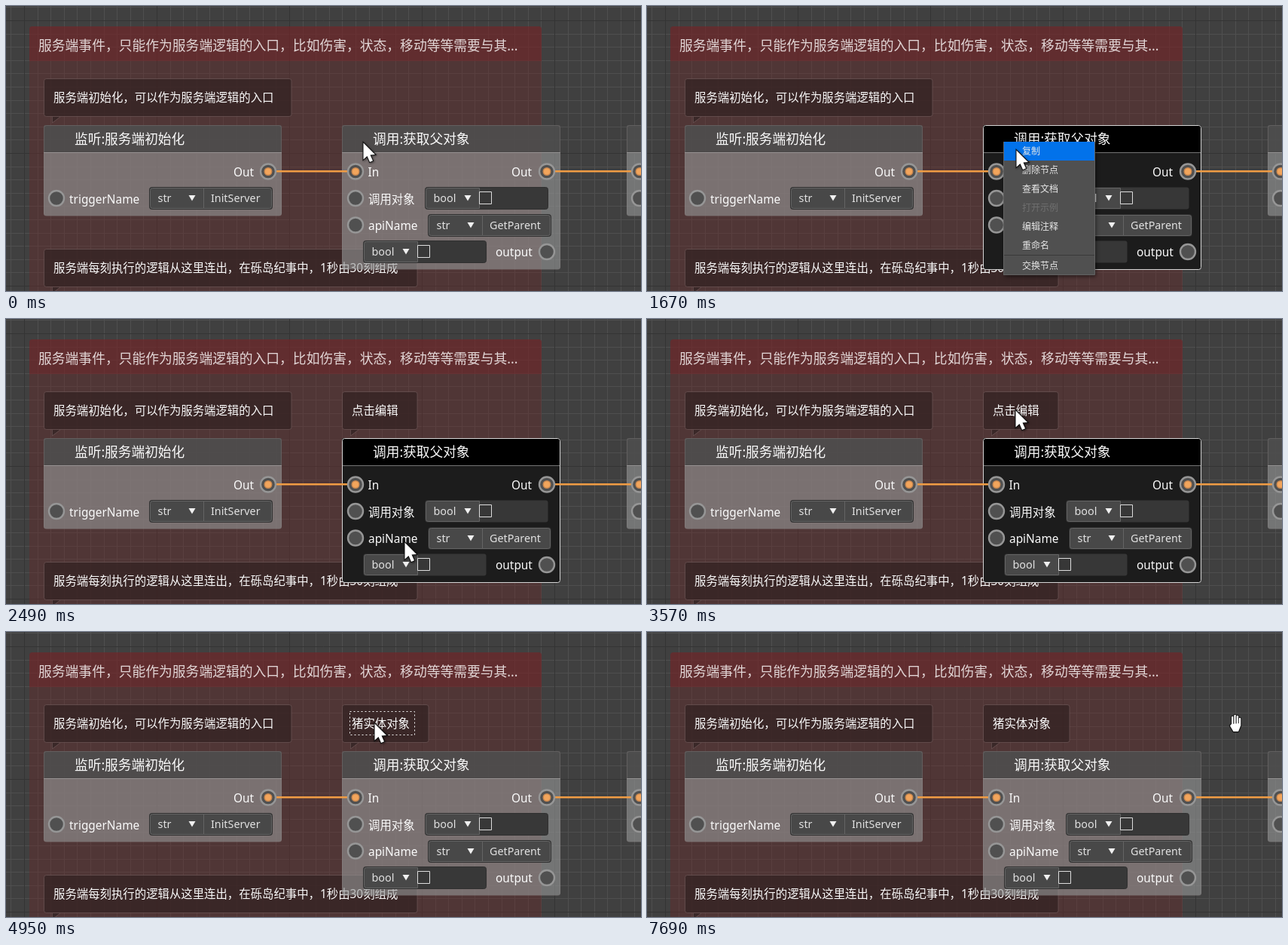
Recreate the animation shown at these times as an HTML page with a canvas. Size 843 px wide and 378 px high, loop 8.48 s.

```html
<!DOCTYPE html>
<html lang="zh-CN">
<head>
<meta charset="utf-8">
<style>
html, body { margin: 0; width: 100%; height: 100%; overflow: hidden; background: #404040; }
canvas { display: block; }
</style>
</head>
<body>
<canvas id="stage" width="843" height="378"></canvas>
<script>
const c = document.getElementById('stage').getContext('2d');
const LOOP = 8480, ORANGE = '#f09c44';
const MENU = ['复制', '删除节点', '查看文档', '打开示例', '编辑注释', '重命名', '交换节点'];
// Cursor moves: first change, last change, steps, target x, target y
const MOVES = [
  [1670, 1670, 1, 490, 191],
  [1740, 2090, 6, 529, 296],
  [3020, 3570, 8, 489, 121],
  [5480, 5760, 5, 574, 124],
  [6350, 6490, 3, 572, 122],
  [7410, 7690, 5, 781, 121]
];

function box(x, y, w, h, fill, stroke, r = 3) {
  c.beginPath();
  c.roundRect(x, y, w, h, r);
  if (fill) { c.fillStyle = fill; c.fill(); }
  if (stroke) { c.strokeStyle = stroke; c.lineWidth = 1; c.stroke(); }
}

function text(s, x, y, size = 15.4, color = '#fafafa', weight = 400) {
  c.font = `${weight} ${size}px "Noto Sans", "Noto Sans CJK SC", sans-serif`;
  c.fillStyle = color;
  c.fillText(s, x, y);
}

function poly(points, fill, stroke, width = 1) {
  c.beginPath();
  points.forEach(([x, y]) => c.lineTo(x, y));
  c.closePath();
  if (stroke) { c.strokeStyle = stroke; c.lineWidth = width; c.stroke(); }
  if (fill) { c.fillStyle = fill; c.fill(); }
}

function line(x1, y1, x2, y2, color, width = 1) {
  c.beginPath();
  c.moveTo(x1, y1);
  c.lineTo(x2, y2);
  c.strokeStyle = color;
  c.lineWidth = width;
  c.stroke();
}

function disc(x, y, r, fill, stroke, width) {
  c.beginPath();
  c.arc(x, y, r, 0, 7);
  if (fill) { c.fillStyle = fill; c.fill(); }
  if (stroke) { c.strokeStyle = stroke; c.lineWidth = width; c.stroke(); }
}

function grid(offset, step, color) {
  for (let x = 24 + offset; x < 843; x += step) line(Math.round(x) + .5, 0, Math.round(x) + .5, 378, color);
  for (let y = 19 + offset; y < 378; y += step) line(0, Math.round(y) + .5, 843, Math.round(y) + .5, color);
}

function group() {
  box(31, 27, 680, 400, 'rgba(100,42,42,.45)', null, 4);
  box(31, 27, 680, 46, 'rgba(118,34,38,.45)', null, [4, 4, 0, 0]);
  text('服务端事件，只能作为服务端逻辑的入口，比如伤害，状态，移动等等需要与其...', 43, 58.6, 17.8, '#e2d6d6', 300);
}

function bubble(x, y, w, label) {
  const fill = 'rgba(50,34,34,.72)', edge = 'rgba(118,94,94,.6)';
  box(x + .5, y + .5, w - .5, 50, fill, edge);
  poly([[x + 11, y + 51], [x + 11, y + 59], [x + 22, y + 51]], fill);
  line(x + 11.5, y + 51, x + 11.5, y + 59, edge);
  line(x + 11.5, y + 59, x + 22, y + 51, edge);
  text(label, x + 13, y + 31);
}

function node(x, w, h, title, selected) {
  const y = 158;
  box(x, y, w, h, selected ? '#1c1c1c' : 'rgba(150,152,152,.6)');
  box(x, y, w, 36, selected ? '#000' : 'rgba(58,58,58,.68)', null, [3, 3, 0, 0]);
  line(x, y + 36.5, x + w, y + 36.5, selected ? '#747474' : 'rgba(175,172,172,.6)');
  box(x + .5, y + .5, w - 1, h, null, selected ? '#d4d4d4' : 'rgba(145,140,140,.3)');
  text(title, x + 41, y + 25.4, 17.7);
}

function port(x, y, linked) {
  disc(x, y, 10, '#505050', '#969696', 2.4);
  if (!linked) return;
  disc(x, y, 5.5, '#c98850');
  disc(x, y, 4, '#f2a55c');
}

function field(x, y, type, value, dark) {
  box(x + .5, y + .5, 163, 29, dark ? '#373737' : '#383838', dark ? null : '#303030');
  box(x + 1.5, y + 1.5, 71, 27, '#484848', '#646464', [3, 0, 0, 3]);
  text(type, x + 11.5, y + 20, 14.4, '#e2e2e2');
  const tx = x + 57;
  poly([[tx - 4.5, y + 11], [tx + 4.5, y + 11], [tx, y + 18.5]], '#f0f0f0');
  if (value) {
    box(x + 72.5, y + 1.5, 90, 27, '#484848', '#646464', [0, 3, 3, 0]);
    text(value, x + 82, y + 20, 14.3, '#e2e2e2');
  } else {
    box(x + 72.5, y + 6.5, 16, 16, null, '#ddd', 0);
  }
}

function nodes(selected) {
  node(50, 316, 120, '监听:服务端初始化', false);
  node(446, 290, 191, '调用:获取父对象', selected);
  node(824, 316, 120, '', false);
  line(358, 219.3, 454, 219.3, ORANGE, 2.5);
  line(728, 219.3, 831, 219.3, ORANGE, 2.5);
  [[348, 219.5, 1], [67, 255], [464, 219.5, 1], [718, 219.5, 1], [464, 255], [464, 290.5], [718, 326], [841, 219.5, 1], [841, 255]]
    .forEach(p => port(...p));
  text('Out', 302, 225.6);
  text('triggerName', 84, 262);
  text('In', 480.5, 225.6);
  text('Out', 671, 225.6);
  text('调用对象', 481, 261.8);
  text('apiName', 481, 297);
  text('output', 650, 332);
  field(190, 240, 'str', 'InitServer');
  field(556, 240, 'bool', '', selected);
  field(560, 276, 'str', 'GetParent', selected);
  field(474, 311, 'bool', '', selected);
}

function menu(alpha, hover) {
  c.save();
  c.globalAlpha = alpha;
  c.shadowColor = 'rgba(0,0,0,.5)';
  c.shadowBlur = 5;
  c.shadowOffsetX = c.shadowOffsetY = 2;
  box(473, 180, 121, 177, '#505050', null, 0);
  c.shadowColor = 'transparent';
  box(473.5, 180.5, 121, 176, null, '#626262', 0);
  if (hover >= 0 && hover !== 3) box(474, 180 + hover * 25, 120, 25, '#0272ea', null, 0);
  line(474, 330.5, 594, 330.5, '#393939');
  MENU.forEach((s, i) => text(s, 498, 197 + i * 25 + (i === 6 ? 2 : 0), 12, i === 3 ? '#707070' : '#e8e8e8'));
  c.restore();
}

function arrow(x, y) {
  c.save();
  c.translate(x, y);
  c.shadowColor = 'rgba(0,0,0,.4)';
  c.shadowBlur = 3;
  c.shadowOffsetX = c.shadowOffsetY = 1;
  poly([[.5, .5], [.5, 22.5], [5.5, 18], [9, 26], [13, 24.3], [9.5, 16.5], [16, 16]], '#fff', '#111', 2);
  c.restore();
}

function hand(x, y) {
  c.save();
  c.translate(x, y);
  c.lineCap = c.lineJoin = 'round';
  const fingers = [[-3.6, -8], [-.4, -10], [2.9, -9], [6, -6]];
  const palm = [[-5, 1], [7, 0], [6.5, 5], [4, 11], [-2.5, 11], [-7, 3.5], [-6, 2]];
  poly(palm, null, '#111', 2.4);
  for (const [fx, top] of fingers) {
    line(fx, top, fx, 3, '#111', 4.4);
    line(fx, top, fx, 3, '#fff', 2.5);
  }
  poly(palm, '#fff');
  c.restore();
}

function cursorAt(t) {
  let x = 474, y = 181;
  for (const [from, to, steps, tx, ty] of MOVES) {
    if (t < from) break;
    const gap = (to - from) / (steps - 1) || 1;
    const p = Math.min(1, (Math.floor((t - from) / gap + 1e-6) + 1) / steps);
    const e = p * p * (3 - 2 * p);
    x += (tx - x) * e;
    y += (ty - y) * e;
  }
  return [x, y];
}

function noteAt(t) {
  if (t >= 4620) return '猪实体对象';
  const erased = t < 4160 ? 0 : t < 4260 ? 1 : t < 4360 ? 3 : 4;
  return '点击编辑'.slice(0, 4 - erased);
}

function note(t) {
  const label = noteAt(t), long = t >= 4620;
  bubble(446, 96, long ? 115 : 100, label);
  if (t < 3900 || t >= 6420) return;
  c.setLineDash([2, 3]);
  box(456.5, 105.5, long ? 86 : 70, 31, null, '#f0f0f0', 0);
  c.setLineDash([]);
  const caretOn = t < 4950 || (t >= 5480 && t < 6020);
  if (caretOn) line(461 + label.length * 15.4, 110, 461 + label.length * 15.4, 133, '#eee');
}

function menuAlpha(t) {
  if (t < 1200 || t >= 2490) return 0;
  if (t < 1270) return .2;
  if (t < 1340) return .65;
  return t < 2420 ? 1 : .4;
}

function draw(t) {
  c.fillStyle = '#404040';
  c.fillRect(0, 0, 843, 378);
  grid(-17.6, 17.6, '#4f4f4f');
  grid(0, 176, '#343434');
  group();
  bubble(50, 96, 329, '服务端初始化，可以作为服务端逻辑的入口');
  bubble(50, 322, 496, '服务端每刻执行的逻辑从这里连出，在砾岛纪事中，1秒由30刻组成');
  nodes(t >= 990 && t < 3900);
  if (t >= 2420) note(t);
  const [x, y] = cursorAt(t), alpha = menuAlpha(t);
  if (alpha) menu(alpha, t < 1670 ? -1 : Math.floor((y - 180) / 25));
  (x > 711 ? hand : arrow)(x, y);
}

function frame() {
  draw(performance.now() % LOOP);
  requestAnimationFrame(frame);
}
frame();
</script>
</body>
</html>
```
